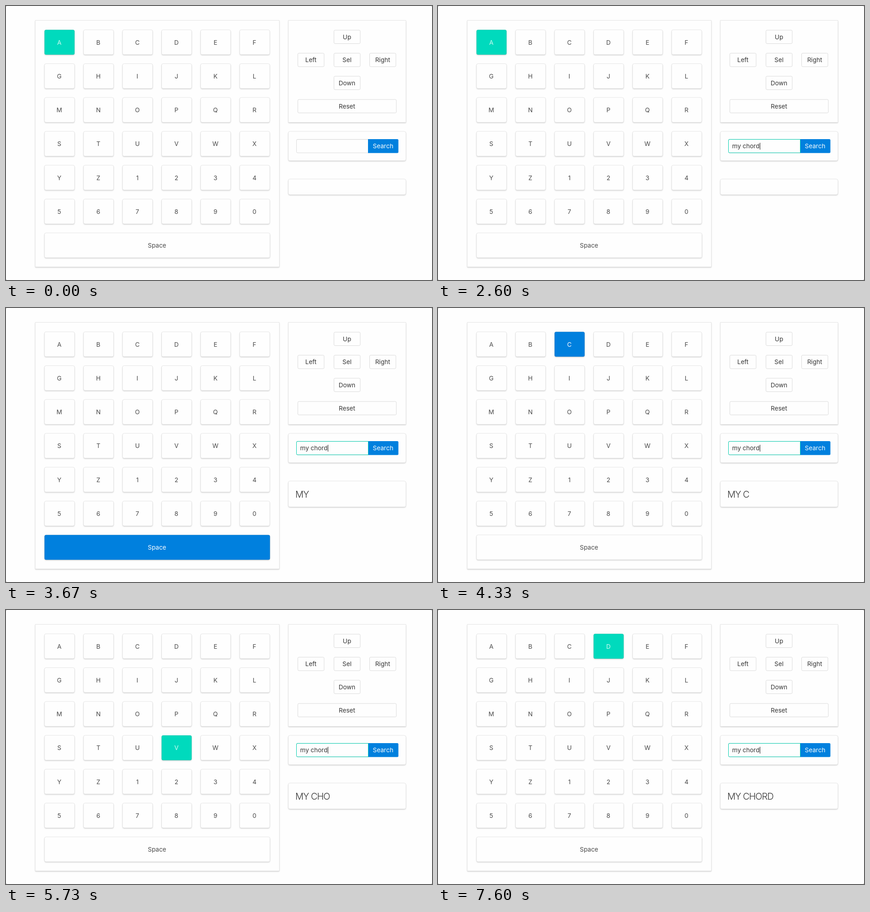
An HTML page with a canvas that plays this animation: 932 by 601 pixels, repeating every 8000 ms.

```html
<!DOCTYPE html>
<html lang="en">
<head>
<meta charset="utf-8">
<title>On-screen keyboard</title>
<style>
html, body { margin: 0; width: 100%; height: 100%; overflow: hidden; background: #fefefe; }
canvas { display: block; }
</style>
</head>
<body>
<canvas id="stage" width="932" height="601"></canvas>
<script>
const ctx = document.getElementById('stage').getContext('2d');
const LOOP = 8000;
const WHITE = '#fefefe', TEAL = '#00dabd', BLUE = '#0080de', INK = '#4a4a4a';
const FONT = 'Inter, Roboto, sans-serif';
const KEYS = 'ABCDEFGHIJKLMNOPQRSTUVWXYZ1234567890';
const QUERY = 'my chord';

// Times at which each character of the query is typed
const TYPED = [1400, 1530, 1600, 1730, 1870, 1930, 2070, 2200];

// Cursor walk, one step per 100 ms; * presses the key, _ is the space bar
const WALK = 'G H I I* I O U T T* _* T N H B C C* C I O P Q R R* R Q P O O* O U V W W* W Q K E D D* D'.split(' ');
const FPS = 15, WALK_START = 41, STEP = 1.5, LATE_STEP = 16;

function box(x, y, w, h, r, fill) {
  ctx.beginPath();
  ctx.roundRect(x, y, w, h, r);
  ctx.fillStyle = fill;
  ctx.fill();
}

function outline(x, y, w, h, r, color) {
  ctx.beginPath();
  ctx.roundRect(x, y, w, h, r);
  ctx.lineWidth = 1;
  ctx.strokeStyle = color;
  ctx.stroke();
}

function card(x, y, w, h, r, fill = WHITE) {
  ctx.save();
  ctx.shadowColor = 'rgba(10,10,10,.16)';
  ctx.shadowBlur = 2.5;
  ctx.shadowOffsetY = 1.5;
  box(x, y, w, h, r, fill);
  ctx.restore();
  outline(x, y, w, h, r, 'rgba(10,10,10,.09)');
}

function label(text, x, y, color = INK, align = 'center') {
  ctx.font = `400 13.5px ${FONT}`;
  ctx.textAlign = align;
  ctx.fillStyle = color;
  ctx.fillText(text, x, y + 4.9);
}

function key(text, x, y, w, state) {
  const fill = { on: TEAL, pressed: BLUE }[state] || WHITE;
  const ink = { on: '#d2fbf3', pressed: '#fff' }[state] || INK;
  card(x, y, w, 54.5, 3.5, fill);
  label(text, x + w / 2 - 0.5, y + 27.5, ink);
}

function button(text, x, y, w = 58) {
  outline(x + 0.5, y + 0.5, w - 0.5, 29.5, 2.5, '#dbdbdb');
  label(text, x + w / 2, y + 15.3, '#363636');
}

// State of the walk: current key, whether it is pressed, and the entered length
function walkAt(frame) {
  let now = 'A', entered = 0;
  WALK.forEach((step, n) => {
    const start = WALK_START + Math.ceil(n * STEP) + (n === LATE_STEP ? 1 : 0);
    if (frame < start) return;
    now = step;
    if (step.endsWith('*')) entered++;
  });
  return { key: now[0], state: now.endsWith('*') ? 'pressed' : 'on', entered };
}

function drawKeyboard(walk) {
  card(64, 31.5, 534, 541, 0);
  [...KEYS].forEach((ch, i) => {
    const x = 84.2 + (i % 6) * 85.4, y = 52.2 + Math.floor(i / 6) * 74.25;
    key(ch, x, y, 65.8, ch === walk.key && walk.state);
  });
  key('Space', 84.2, 497.7, 493.3, walk.key === '_' && walk.state);
}

function drawPad() {
  card(617.5, 31.5, 257.5, 224, 0);
  button('Up', 717, 52.5);
  button('Left', 638, 103);
  button('Sel', 717, 103);
  button('Right', 795, 103);
  button('Down', 717, 153.5);
  button('Reset', 638, 204.5, 216);
}

function drawSearch(t) {
  card(617.5, 275, 257.5, 64.5, 4);
  outline(635.5, 292.5, 157, 29.5, [2.5, 0, 0, 2.5], '#dbdbdb');
  ctx.fillStyle = 'rgba(10,10,10,.04)';
  ctx.fillRect(636, 293, 156, 1);
  box(792, 292, 66.5, 30.5, [0, 2.5, 2.5, 0], BLUE);
  label('Search', 825, 307.5, '#fff');

  const focus = Math.min(1, Math.max(0, (t - 870) / 260));
  if (!focus) return;
  ctx.globalAlpha = focus;
  outline(635.5, 292.5, 157, 29.5, [2.5, 0, 0, 2.5], '#00cdb0');
  ctx.globalAlpha = 1;

  const text = QUERY.slice(0, TYPED.filter(at => t >= at).length);
  label(text, 643.5, 307.5, '#363636', 'left');
  const blinkOff = t >= 7000 && t < 7470;
  if (t >= 930 && !blinkOff) {
    ctx.fillStyle = '#222';
    ctx.fillRect(Math.round(644 + ctx.measureText(text).width), 300, 1, 15);
  }
}

function drawResult(count) {
  card(617.5, 379.5, 257.5, count ? 57 : 34.5, 4);
  ctx.save();
  ctx.font = `300 20px ${FONT}`;
  ctx.letterSpacing = '-1px';
  ctx.textAlign = 'left';
  ctx.fillStyle = '#363636';
  ctx.fillText(QUERY.slice(0, count).toUpperCase(), 633, 415.5);
  ctx.restore();
}

function draw(t) {
  const walk = walkAt(Math.floor(t * FPS / 1000 + 0.1));
  ctx.fillStyle = '#8a8a8a';
  ctx.fillRect(0, 0, 932, 601);
  box(0, 0, 932, 601, 2, WHITE);
  drawKeyboard(walk);
  drawPad();
  drawSearch(t);
  drawResult(walk.entered);
}

function tick() {
  draw(performance.now() % LOOP);
  requestAnimationFrame(tick);
}
tick();
</script>
</body>
</html>
```
